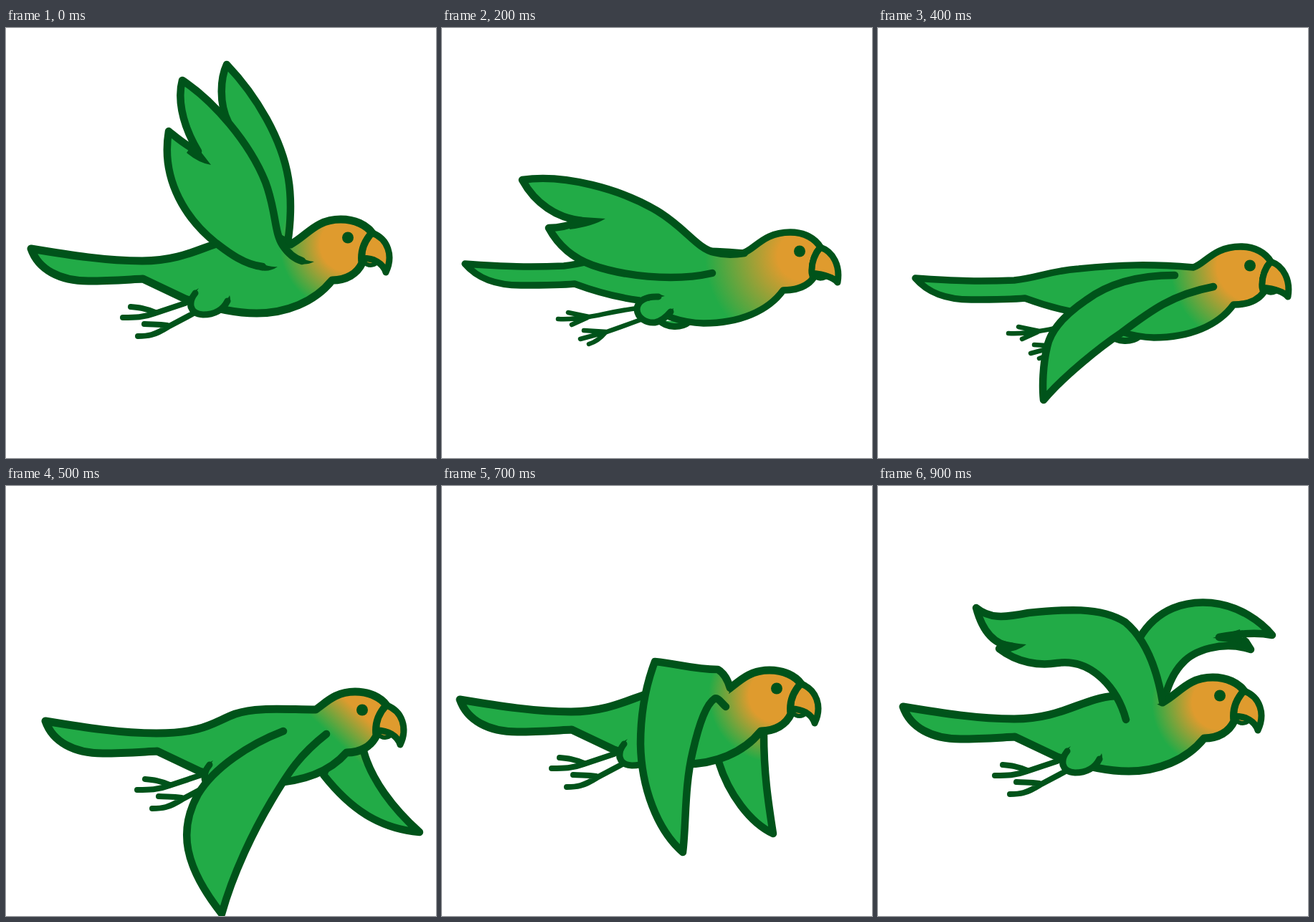
Animation, 600 px wide and 600 px high, one loop 1 s. Source, as an HTML page:

```html
<!DOCTYPE html>
<html lang="en">
<head>
<meta charset="utf-8">
<title>Flying parrot</title>
<style>
  html, body { margin: 0; width: 100%; height: 100%; overflow: hidden; background: #fff; }
  svg { display: block; width: 100%; height: 100%; }
  path { stroke: #00531a; stroke-width: 11; stroke-linecap: round; stroke-linejoin: round; }
  .leg { fill: none; stroke-width: 8; }
  .toe { fill: none; stroke-width: 6.5; }
  .thigh { stroke-width: 9; }
  .beak { fill: #df9b2e; stroke-width: 9; }
  .lip { fill: #df9b2e; stroke-width: 6; }
  .ink { fill: #00531a; stroke: none; }
  .level { stroke-width: 9.5; }
  .wing { stroke-width: 10.5; }

  /* ten drawings, each held for a tenth of the loop */
  .pose {
    visibility: hidden;
    animation: hold 1000ms step-end infinite;
    animation-delay: calc(var(--i) * 100ms - 1000ms);
  }
  @keyframes hold {
    0% { visibility: visible; }
    10%, 100% { visibility: hidden; }
  }
</style>
</head>
<body>
<svg viewBox="0 0 600 600">
  <defs>
    <radialGradient id="glow" gradientUnits="userSpaceOnUse" cx="476" cy="302" r="94">
      <stop offset=".4" stop-color="#df9b2e"/><stop offset="1" stop-color="#22ab47"/>
    </radialGradient>
    <linearGradient id="glowSlant" gradientUnits="userSpaceOnUse" x1="430" y1="325" x2="465" y2="288">
      <stop offset="0" stop-color="#22ab47"/><stop offset="1" stop-color="#df9b2e"/>
    </linearGradient>
    <radialGradient id="glowWide" gradientUnits="userSpaceOnUse" cx="502" cy="318" r="135">
      <stop offset=".25" stop-color="#df9b2e"/><stop offset="1" stop-color="#22ab47"/>
    </radialGradient>
    <radialGradient id="glowLow" gradientUnits="userSpaceOnUse" cx="502" cy="312" r="114">
      <stop offset=".43" stop-color="#df9b2e"/><stop offset="1" stop-color="#22ab47"/>
    </radialGradient>

    <!-- raised tail -->
    <g id="legs">
      <path class="leg" d="M250,384 L208,398 C192,404 180,404 163,404 M208,397 C195,391 185,390 174,389"/>
      <path class="leg" d="M260,399 L226,417 C207,429 198,430 184,430 M225,415 C212,413 205,414 193,413"/>
    </g>
    <g id="head">
      <path class="lip" d="M499,326 C505,333 513,332 518,327 L505,321"/>
      <path class="beak" d="M511,286 C533,294 541,318 530,341 C526,328 513,321 497,321 C496,308 501,297 511,286Z"/>
      <path class="leg" d="M511,286 C499,298 495,312 497,328"/>
      <circle class="ink" cx="477" cy="292.500" r="8"/>
    </g>
    <g id="flat">
      <use href="#legs"/>
      <path d="M35,308 C90,317 140,325 190,325 C257,325 270,309 300,298 C330,288 370,292 412,292 C425,284 438,267 467,267 C487,267 503,275 511,286 C500,298 495,312 497,328 C490,343 475,352 455,352 C430,381 390,393 345,395 C320,395 290,391 250,378 L191,350 C170,351 145,353 115,353 C75,353 45,337 35,308Z"/>
      <path class="thigh" d="M264,369 C256,379 252,397 268,397 C279,398 288,389 289,379"/>
      <path class="ink" d="M269,363 Q248,373 254,390 L262,386 Q260,374 269,363Z"/>
      <use href="#head"/>
    </g>
    <g id="open">
      <use href="#legs"/>
      <path d="M35,308 C90,317 140,325 190,325 C257,325 285,296 330,293 C350,290 368,287 397,302 C420,290 432,267 467,267 C487,267 503,275 511,286 C500,298 495,312 497,328 C490,343 475,352 455,352 C430,383 390,398 350,398 C320,398 290,392 250,378 L191,350 C170,351 145,353 115,353 C75,353 45,337 35,308Z"/>
      <path class="thigh" d="M264,370 C255,381 254,399 275,400 C291,400 303,393 309,381"/>
      <path class="ink" d="M269,363 Q250,373 254,392 L262,386 Q260,374 269,363Z M304,382 Q310,378 312,373 Q315,382 308,389Z"/>
      <use href="#head"/>
    </g>

    <!-- level tail -->
    <g id="level">
      <path class="toe" d="M272,391 C240,395 220,401 205,403 Q180,407 162,406 M205,403 L176,397 M203,404 L181,414"/>
      <path class="toe" d="M280,406 Q250,417 230,424 L193,434 M230,424 L198,422 M228,425 Q218,437 205,441"/>
      <path class="thigh" d="M303,408 C314,419 334,419 345,410"/>
      <path class="level" d="M32,329 C90,333 120,334 170,332 C205,328 220,319 260,316 C320,310 360,309 420,314 C437,309 448,285 486,285 C506,285 521,294 528,306 C518,317 515,332 518,349 C510,360 495,366 476,366 C455,395 415,412 365,412 C335,411 310,404 275,380 C245,376 220,370 185,357 C165,359 140,359 110,359 C75,359 50,350 32,329Z"/>
      <path class="thigh" d="M302,375 C286,374 272,380 272,393 C273,405 285,412 297,411 C307,409 314,402 319,396"/>
      <path class="ink" d="M290,372 Q300,369 311,374 Q300,376 288,381Z M313,396 L323,391 321,400Z"/>
      <path class="lip" d="M519,345 C525,352 533,350 538,346 L525,340"/>
      <path class="beak" d="M528,306 C546,312 556,332 552,355 C546,348 535,344 516,342 C515,328 519,317 528,306Z"/>
      <path class="leg" d="M528,306 C517,318 514,334 517,349"/>
      <circle class="ink" cx="499" cy="311.500" r="8"/>
    </g>
  </defs>

  <g class="pose" style="--i:0" fill="url(#glow)">
    <path class="wing" d="M310,131 C297,105 299,70 308,51 C350,95 385,155 394,210 C399,240 397,275 393,299 L366,285 330,180"/>
    <use href="#open"/>
    <path class="wing" d="M358,333 C330,330 305,309 293,300 C255,270 215,215 227,144 C237,152 250,164 268,172 C243,130 240,95 246,73 C290,102 340,160 362,215 C377,255 374,285 386,303 C394,315 403,322 413,325"/>
    <path class="ink" d="M262,160 L286,191 Q268,188 252,174Z M355,328 Q367,334 379,333 Q368,341 354,338Z M411,319 Q418,325 430,326 Q418,332 408,328Z"/>
  </g>

  <g class="pose" style="--i:1" fill="url(#glowWide)" transform="translate(-10 -10)">
    <use href="#level"/>
    <path class="wing" d="M378,342 C320,350 275,335 245,315 C205,288 182,250 174,208 C190,216 205,222 222,224 C190,200 173,165 175,128 C245,148 315,195 350,250 C370,285 385,316 420,314"/>
    <path class="ink" d="M216,214 L247,232 Q225,234 205,227Z"/>
  </g>

  <g class="pose" style="--i:2" fill="url(#glowWide)">
    <use href="#level"/>
    <path class="wing" d="M377,342 C320,355 250,345 210,331 C185,322 163,305 149,279 C165,279 180,275 195,269 C160,265 130,245 112,212 C170,203 250,225 300,255 C340,279 355,307 380,313 C395,317 410,316 422,314"/>
    <path class="ink" d="M183,263 L228,266 Q210,277 178,281Z"/>
  </g>

  <g class="pose" style="--i:3" fill="url(#glowLow)" transform="translate(10 10)">
    <use href="#level"/>
    <path class="wing" d="M390,322 C330,314 245,312 195,335 C157,354 133,377 119,397 C180,405 240,398 290,387 C345,374 395,360 435,341"/>
  </g>

  <g class="pose" style="--i:4" fill="url(#glowLow)" transform="translate(20 20)">
    <use href="#level"/>
    <path class="wing" d="M394,325 C360,325 310,330 270,360 C235,384 220,405 216,425 C210,450 209,480 211,499 C240,465 290,425 320,405 C360,375 390,352 448,341"/>
  </g>

  <g class="pose" style="--i:5" fill="url(#glowSlant)" transform="translate(20 20)">
    <path class="wing" d="M440,340 L423,383 C460,430 500,458 557,463 C520,430 490,390 479,350 L440,340"/>
    <use href="#flat"/>
    <path class="wing" d="M367,322 C320,340 270,373 248,410 C220,460 228,510 281,577 C297,520 325,462 350,420 C375,378 390,355 427,326"/>
  </g>

  <g class="pose" style="--i:6" fill="url(#glow)">
    <path class="wing" d="M390,390 L448,546 C470,552 490,560 511,563 C480,505 452,430 446,364"/>
    <use href="#flat"/>
    <path class="wing" d="M330,329 C315,360 306,395 306,430 C306,490 335,530 375,550 C405,563 435,570 460,569 C435,510 400,445 388,395 C380,365 376,345 374,328"/>
  </g>

  <g class="pose" style="--i:7" fill="url(#glow)" transform="translate(-10 -10)">
    <path class="wing" d="M396,395 C410,440 440,480 472,495 C465,450 459,410 459,355"/>
    <use href="#open"/>
    <path class="wing" d="M412,292 C409,282 405,272 395,266 C360,266 340,258 307,255 C290,300 287,340 287,370 C288,430 310,490 346,521 C351,480 348,430 360,380 C368,345 378,315 390,307 C395,304 400,313 406,318"/>
  </g>

  <g class="pose" style="--i:8" fill="url(#glow)" transform="translate(-10 -10)">
    <path class="wing" fill="#22ab47" d="M375,235 C395,205 440,195 475,208 C510,218 540,243 555,279 C510,258 445,245 398,301"/>
    <use href="#open"/>
    <path class="wing" d="M397,301 C390,250 350,210 300,205 C260,203 215,235 188,298 C225,278 270,273 300,295 C322,308 336,318 344,328"/>
  </g>

  <g class="pose" style="--i:9" fill="url(#glow)">
    <path class="wing" fill="#22ab47" d="M365,212 C390,170 430,160 465,163 C505,167 535,190 550,208 C525,203 500,207 476,211 C495,214 508,212 513,217 L520,228 C480,215 440,230 425,247 C410,262 403,285 398,301"/>
    <path class="ink" d="M505,200 L467,212 Q490,214 508,221Z"/>
    <use href="#open"/>
    <path class="wing" d="M397,301 C390,260 375,215 345,190 C310,168 260,172 210,177 C175,184 155,185 137,170 C145,200 160,222 188,224 C180,227 175,227 169,227 C195,247 225,251 250,247 C300,240 335,285 346,326"/>
    <path class="ink" d="M168,214 Q190,220 207,221 Q195,231 175,232Z"/>
  </g>
</svg>
</body>
</html>
```
